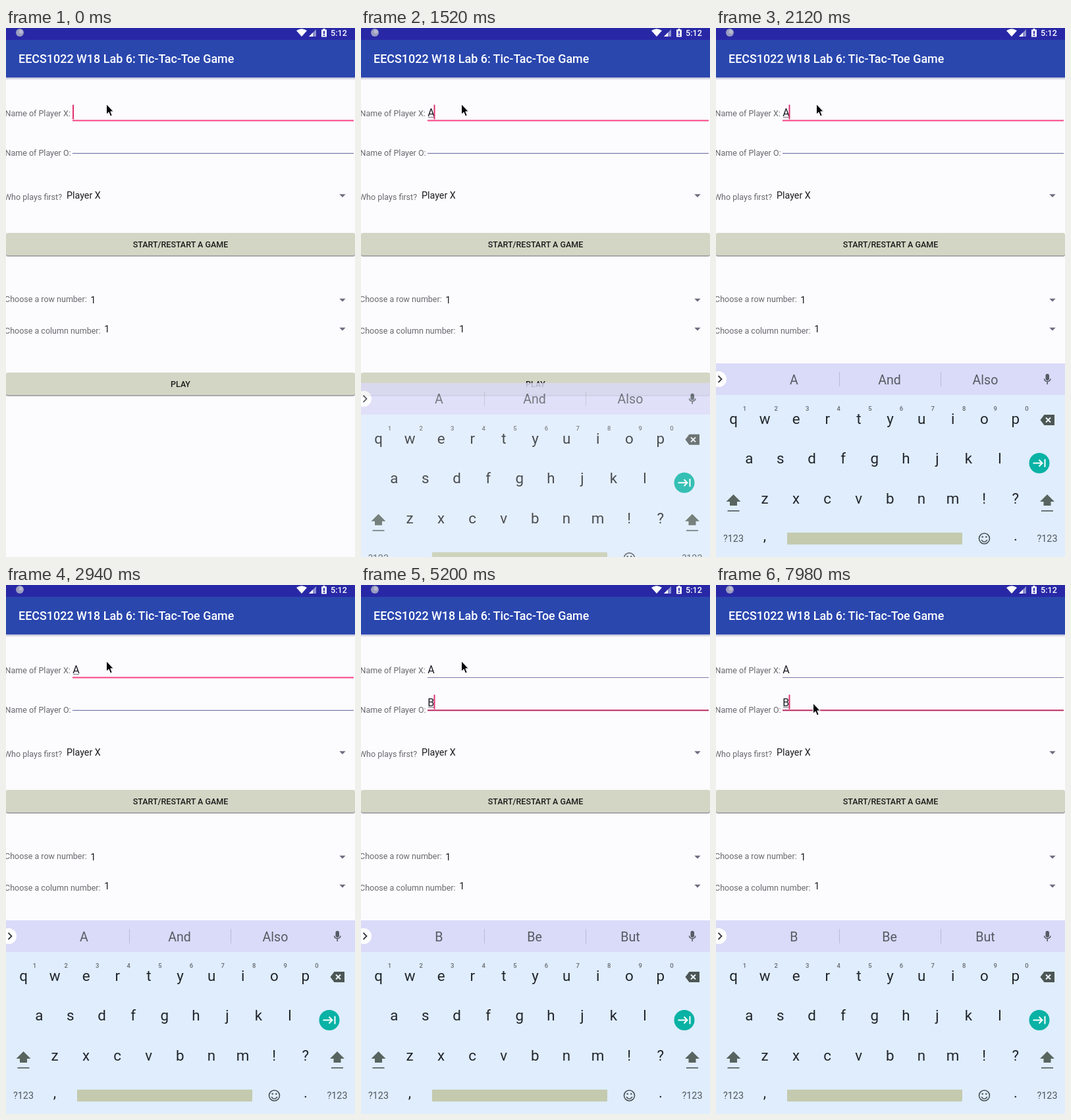
Recreate the animation shown at these times as an HTML page. Size 530 by 803 pixels, loop 8000 ms.

```html
<!DOCTYPE html>
<html lang="en">
<head>
<meta charset="utf-8">
<title>Tic-Tac-Toe setup</title>
<style>
  html, body { margin: 0; width: 100%; height: 100%; overflow: hidden; background: #fcfcfe; }
  svg { display: block; width: 530px; height: 803px; font-family: Roboto, sans-serif; }
  .label { font-size: 12.5px; fill: #68686e; }
  .value { font-size: 14.3px; fill: #1c1c20; }
  .input { font-size: 16.07px; fill: #1c1c24; }
  .button { font-size: 12.5px; font-weight: 500; fill: #1c1c1c; text-anchor: middle; }
  #keyboard text { text-anchor: middle; }
  .key { font-size: 22.4px; fill: #22262c; }
  .hint { font-size: 9.5px; font-weight: 500; fill: #64686c; }
  .small { font-size: 14.3px; fill: #50565c; }
  .word { font-size: 19.6px; fill: #545c62; }
</style>
</head>
<body>
<svg viewBox="0 0 530 803">
  <defs>
    <linearGradient id="shade" x2="0" y2="1">
      <stop stop-color="#a4a4c4"/><stop offset="1" stop-color="#fcfcfe"/>
    </linearGradient>
    <path id="drop" d="M-4.7-2.3H4.7L0 2.6Z" fill="#6c6c80"/>
    <g id="panel">
      <rect y="2" width="530" height="34" rx="3" fill="#a8a9ac"/>
      <rect width="530" height="34" rx="3" fill="#d4d6c5"/>
    </g>
    <g id="shift">
      <path d="M0-12L11-1H5.5V5H-5.5V-1H-11Z" fill="#58645f"/>
      <path d="M-9 13H9" stroke="#68747a" stroke-width="2"/>
    </g>
  </defs>
  <rect width="530" height="803" fill="#fcfcfe"/>

  <rect y="74" width="530" height="5" fill="url(#shade)"/>
  <rect width="530" height="75" fill="#2a47ae"/>
  <rect width="530" height="18" fill="#2828a6"/>
  <circle cx="21" cy="7" r="6" fill="#9a9cc0"/>
  <circle cx="22.5" cy="5.5" r="3" fill="#b8bad0"/>
  <g fill="#fff">
    <path d="M441 4Q449-1.5 457 4L449 13Z"/>
    <path d="M471 2V13H460Z" fill="#8d91d0"/>
    <path d="M466 7V13H460Z"/>
    <path d="M479 2.5H481.5V1H484.5V2.5H487V13.5H479Z"/>
    <path d="M482 4.5H484V9H482ZM482 10H484V12H482Z" fill="#2828a6"/>
    <text x="493" y="12" font-size="12.6" font-weight="500">5:12</text>
    <text x="19" y="53" font-size="17.95" font-weight="500">EECS1022 W18 Lab 6: Tic-Tac-Toe Game</text>
  </g>

  <g class="label">
    <text x="-1.5" y="133.7">Name of Player X:</text>
    <text x="-1.5" y="194.3">Name of Player O:</text>
    <text x="-3" y="261.3">Who plays first?</text>
    <text x="-2" y="415.6">Choose a row number:</text>
    <text x="-2" y="463.6">Choose a column number:</text>
  </g>
  <g class="value">
    <text x="92" y="259.4">Player X</text>
    <text x="128.3" y="418">1</text>
    <text x="149.3" y="462">1</text>
  </g>
  <use href="#drop" x="511" y="254.5"/>
  <use href="#drop" x="511" y="413"/>
  <use href="#drop" x="511" y="457"/>

  <use href="#panel" y="311"/>
  <text class="button" x="265" y="333">START/RESTART A GAME</text>
  <use href="#panel" y="523"/>
  <text class="button" x="265" y="545.3">PLAY</text>

  <path id="lineX" d="M101 140.5H528"/>
  <path id="lineO" d="M101 190.3H528"/>
  <g class="input">
    <text id="nameX" x="101.3" y="133.6">A</text>
    <text id="nameO" x="101.3" y="183.6">B</text>
  </g>
  <path id="composing" stroke="#77778a"/>
  <path id="caret" stroke="#e0306e" stroke-width="2"/>

  <g id="keyboard">
    <rect y="509" width="530" height="49" fill="#dadaf9"/>
    <rect y="557" width="530" height="320" fill="#dfedfd"/>
    <circle cx="4" cy="533" r="12" fill="#fff"/>
    <path d="M3.5 528L8.5 533L3.5 538" fill="none" stroke="#33383c" stroke-width="1.8"/>
    <path d="M187.5 522V544M341.5 522V544" stroke="#bcbcd4"/>
    <g class="word" id="words">
      <text x="118.3" y="540.6"/><text x="263.5" y="540.6"/><text x="409" y="540.6"/>
    </g>
    <rect x="500.5" y="525" width="5.5" height="10" rx="2.7" fill="#545c64"/>
    <path d="M498.5 532.5A4.8 4.8 0 0 0 508 532.5M503.2 537.5V541" fill="none" stroke="#545c64" stroke-width="1.6"/>
    <path d="M492.5 595L498.5 587H514V603H498.5Z" fill="#4c5655"/>
    <path d="M501 591.5L508 598.5M508 591.5L501 598.5" stroke="#eef6fc" stroke-width="1.9"/>
    <circle cx="491" cy="660.5" r="15.5" fill="#08b2a4"/>
    <path d="M481.5 660.5H495M490.5 655.5L495.5 660.5L490.5 665.5M499.5 654.5V666.5" fill="none" stroke="#fff" stroke-width="2"/>
    <use href="#shift" x="26.5" y="720"/>
    <use href="#shift" x="503" y="720"/>
    <rect x="108" y="766" width="266" height="18" rx="1" fill="#c4caae"/>
    <g fill="none" stroke="#4c5458" stroke-width="1.6">
      <circle cx="407.5" cy="775" r="8"/>
      <path d="M403 777Q407.5 783 412 777"/>
    </g>
    <circle cx="404.7" cy="772.5" r="1.3" fill="#4c5458"/>
    <circle cx="410.3" cy="772.5" r="1.3" fill="#4c5458"/>
    <g id="keys"></g>
  </g>

  <path id="pointer" d="M0 0V15.6L3.6 12.4L6 18.4L8.7 17.2L6.3 11.4H10.8Z" fill="#08080c" stroke="#fff"/>
</svg>
<script>
const LOOP = 8000;
const TYPE_X = 1060, KEYBOARD_IN = 1440, FOCUS_O = 3560, TYPE_O = 5060, MOVE = 7700, MOVE_END = 7920;
const BLINK_STARTS = [0, TYPE_X, FOCUS_O, TYPE_O, MOVE_END];
const get = id => document.getElementById(id);
const set = (id, attrs) => {
  for (const name in attrs) get(id).setAttribute(name, attrs[name]);
};
const show = (id, visible) => set(id, { visibility: visible ? 'visible' : 'hidden' });

const keyText = (cls, x, y, text) => `<text class="${cls}" x="${x}" y="${y}">${text}</text>`;
const keyRow = (letters, x, y, cls = 'key') =>
  [...letters].map((letter, i) => keyText(cls, x + i * 47.6, y, letter)).join('');
get('keys').innerHTML =
  keyRow('qwertyuiop', 26.5, 601) + keyRow('1234567890', 43.5, 580.7, 'hint') +
  keyRow('asdfghjkl', 50.3, 661) + keyRow('zxcvbnm!?', 74, 722) +
  keyText('small', 26.5, 780, '?123') + keyText('small', 503, 780, '?123') +
  keyText('key', 74, 778, ',') + keyText('key', 455, 778, '.');

const clamp = v => Math.min(1, Math.max(0, v));
const progress = (t, from, to) => clamp((t - from) / (to - from));

function styleLine(id, focused, color) {
  set(id, focused ? { stroke: color, 'stroke-width': 2 } : { stroke: '#7c7ca8', 'stroke-width': 1.2 });
}

function render(t) {
  const onO = t >= FOCUS_O;
  const typed = onO ? t >= TYPE_O : t >= TYPE_X;
  const baseY = onO ? 183.5 : 133.5;

  styleLine('lineX', !onO, '#fa4384');
  styleLine('lineO', onO, '#bd2c60');
  show('nameX', t >= TYPE_X);
  show('nameO', t >= TYPE_O);
  show('composing', typed);
  set('composing', { d: `M102 ${baseY + 2}H111` });

  const blinkStart = BLINK_STARTS.filter(start => start <= t).pop();
  show('caret', (t - blinkStart) % 1000 < 500);
  set('caret', { d: `M${typed ? 111.5 : 102} ${baseY - 17}v22` });

  const words = onO ? (typed ? 'B Be But' : 'thanks I we') : 'A And Also';
  words.split(' ').forEach((word, i) => { get('words').children[i].textContent = word; });

  const slide = (1 - progress(t, KEYBOARD_IN, KEYBOARD_IN + 240)) ** 2;
  set('keyboard', {
    transform: `translate(0 ${68 * slide})`,
    opacity: progress(t, KEYBOARD_IN, KEYBOARD_IN + 100)
  });

  const p = progress(t, MOVE, MOVE_END), ease = p * p * (3 - 2 * p);
  set('pointer', { transform: `translate(${152.5 - 5 * ease} ${115.5 + 64 * ease})` });
}

function frame() {
  render(performance.now() % LOOP);
  requestAnimationFrame(frame);
}
frame();
</script>
</body>
</html>
```
